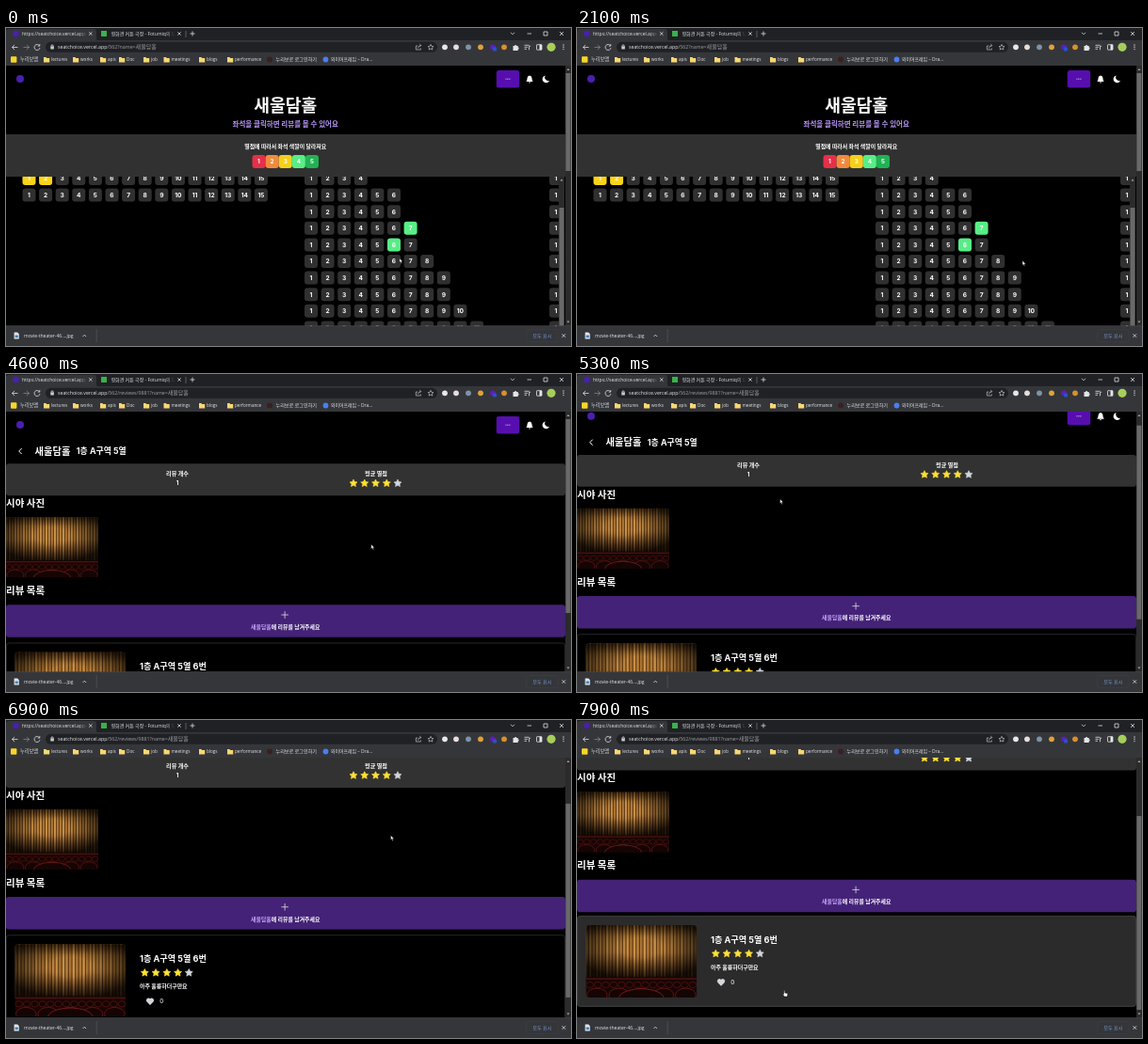
These frames come from a looping animation (600 by 338 pixels, 8000 ms). An HTML page:

```html
<!DOCTYPE html>
<html lang="ko">
<head>
<meta charset="utf-8">
<style>
  html, body { margin: 0; width: 100%; height: 100%; overflow: hidden; background: #000; }
  svg { display: block; width: 100vw; height: 100vh; }
  text { font-family: Inter, "Noto Sans CJK KR", "Noto Sans CJK", sans-serif; fill: #fff; white-space: pre; }
  .ui text, text.ui { font-family: "Open Sans", "Noto Sans CJK KR", "Noto Sans CJK", sans-serif; fill: #e3e5e8; }
  .b { font-weight: 700; }
  .m { text-anchor: middle; }
  text .dim { fill: #9aa0a6; }
  .line { fill: none; stroke: #dcdee1; stroke-width: .8; }
</style>
</head>
<body>
<svg id="stage" viewBox="0 0 600 338"></svg>
<script>
const HALL = '새울담홀';
const LOOP = 8000, PAGE_AT = 3000, HOVER_AT = 7450;
const range = n => Array.from({ length: n }, (_, i) => i);
const rect = (x, y, w, h, fill, r = 0, more = '') =>
  `<rect x="${x}" y="${y}" width="${w}" height="${h}" rx="${r}" fill="${fill}" ${more}/>`;
const dot = (x, y, r, fill) => `<circle cx="${x}" cy="${y}" r="${r}" fill="${fill}"/>`;
const line = (d, more = '') => `<path class="line" d="${d}" ${more}/>`;
const shape = (d, fill) => `<path d="${d}" fill="${fill}"/>`;
// y is the visual middle of the line of text
const text = (s, x, y, size, cls = '', more = '') =>
  `<text x="${x}" y="${y + size * .36}" font-size="${size}" class="${cls}" ${more}>${s}</text>`;
const cross = (x, y, r) => line(`M${x - r} ${y - r}l${2 * r} ${2 * r}m0 ${-2 * r}l${-2 * r} ${2 * r}`);

function star(x, y, r, fill) {
  const pts = range(10).map(i => {
    const a = i * Math.PI / 5 - Math.PI / 2, q = i % 2 ? r * .5 : r;
    return `${(x + q * Math.cos(a)).toFixed(2)},${(y + q * Math.sin(a)).toFixed(2)}`;
  });
  return `<polygon points="${pts.join(' ')}" fill="${fill}" stroke="${fill}" stroke-width=".6" stroke-linejoin="round"/>`;
}
const stars = (x, y) => range(5).map(i => star(x + i * 11.75, y, 4.2, i < 4 ? '#ffe135' : '#d2d5da')).join('');

function curtain() {
  const folds = range(33).map(i => {
    const glow = .5 + .5 * Math.sin(i * 2.3);
    return rect(i * 3, 0, .9 + glow, 48, '#f2c274', 0, `opacity="${(.1 + .35 * glow).toFixed(2)}"`) +
      rect(i * 3 + 2, 0, .9, 48, '#1c0b02', 0, 'opacity=".5"');
  }).join('');
  const seat = (x, y, rx, ry, color) =>
    `<ellipse cx="${x}" cy="${y}" rx="${rx}" ry="${ry}" fill="#150404" stroke="${color}" stroke-width=".8"/>`;
  const seats = (n, y, rx, ry, color) => range(n).map(i => seat((i + .5) * 98 / n, y, rx, ry, color)).join('');
  return rect(0, 0, 98, 64, '#1a0a03') + rect(0, 0, 98, 48, 'url(#gold)') + folds + rect(0, 0, 98, 48, 'url(#sides)') +
    rect(0, 46, 98, 18, '#180505') + rect(0, 47, 98, 1.3, '#4a120d') +
    seats(14, 53, 3.1, 2.6, '#4a110d') + seats(5, 62, 9, 6, '#5e1612') + seat(49, 65, 20, 8.5, '#7a1d17');
}

function chrome() {
  const folders = [[43, 'lectures'], [74, 'works'], [103, 'apis'], [123, 'Doc'], [149, 'job'],
    [170.5, 'meetings'], [208, 'blogs'], [238, 'performance']];
  const folder = x => shape(`M${x - 3} 31h2.4l.8 1h3v4.4h-6.2z`, '#f7d774');
  const extensions = [[466, '#e6e8ea'], [478, '#e8dddd'], [491, '#7d93a8'], [504, '#e1a13b'], [517, '#5b1fc4'], [529, '#d8902c']];
  return `<g class="ui">` +
    rect(0, 0, 600, 14, '#202124') + rect(0, 13, 600, 27, '#35363a') +
    shape('M0 14V4q0-3 3-3h90q3 0 3 3v7q0 3 3 3z', '#35363a') +
    dot(10.5, 6, 3.2, '#4a1fb0') +
    `<g clip-path="url(#tab1)">${text('https://seatchoice.vercel.app/562', 17, 6, 5)}</g>` + rect(77, 2, 9, 9, 'url(#fadeA)') + cross(89.8, 6, 1.7) +
    rect(101, 3, 6, 6, '#37b24d') +
    `<g clip-path="url(#tab2)">${text('영화관 커튼 극장 - Fotumiq의 무료', 111.5, 6, 5)}</g>` + rect(170, 2, 9, 9, 'url(#fadeB)') + cross(184, 6, 1.7) +
    line('M191 3v7', 'opacity=".4"') + line('M195.5 6h5m-2.5-2.5v5') +
    line('M536 4.8l2 2l2-2M553.5 6h4.5M571 4h4v4h-4z') + cross(590, 6, 2) +
    // toolbar
    line('M12.5 20.5h-6m2.6-2.6l-2.6 2.6l2.6 2.6') + line('M18.5 20.5h6m-2.6-2.6l2.6 2.6l-2.6 2.6', 'opacity=".45"') +
    line('M35.6 18.9a3 3 0 1 0 .4 2.2m-.2-4v2h-2') +
    rect(42, 14.8, 416, 11, '#202124', 5.5) + rect(47.3, 19.6, 3.6, 3, '#c8cacd', .5) + line('M48 20v-1a1.1 1.1 0 0 1 2.2 0v1') +
    `<text id="url" x="55" y="22.2" font-size="5.25"></text>` +
    `<g opacity=".75">` + line('M437 19h-1.6v4h5v-1.5M437.5 21.5q0-3 3.2-3m-1.4-1.4l1.5 1.4l-1.5 1.5') +
    line('M451 17.4l.9 2l2.1.2l-1.6 1.4l.5 2.1l-1.9-1.1l-1.9 1.1l.5-2.1l-1.6-1.4l2.1-.2z') + `</g>` +
    extensions.map(([x, c]) => dot(x, 20.3, 2.9, c)).join('') + rect(517, 20.5, 4, 4, '#2b50c8', .7) +
    shape('M538.5 19h1.6a1 1 0 0 1 2 0h1.6v1.6a1 1 0 0 1 0 2v1.4h-5.2z', '#e3e5e8') +
    line('M550.5 18.3h5m-5 2h3.5m-3.5 2h2.5m2.5 1v-4h1.6') + rect(563.5, 17.7, 5.5, 5.5, 'none', .5, 'stroke="#e3e5e8" stroke-width=".8"') +
    rect(566.5, 17.7, 2.5, 5.5, '#e3e5e8') + dot(579, 20.3, 4.6, '#a5cf5a') +
    [18, 20.3, 22.6].map(y => dot(592, y, .7, '#dcdee1')).join('') +
    // bookmarks
    rect(5, 30.3, 6.4, 6.4, '#f7d52b', 1) + text('누리보맵', 15, 33.4, 5.2) +
    folders.map(([x, s]) => folder(x) + text(s, x + 5, 33.4, 4.65)).join('') +
    dot(280, 33.5, 3, '#3a2020') + text('누리보로 로그인하기', 286.5, 33.4, 5.1) +
    dot(339.5, 33.5, 2.9, '#4a7df0') + text('와이어프레임 – Dra...', 345, 33.4, 4.9) +
    // downloads
    rect(0, 316.5, 600, 21.5, '#35363a') + rect(0, 316.5, 600, .6, '#4a4b4f') +
    shape('M8.6 323.6h3.6l1.6 1.6v5.2h-5.2z', '#e3e5e8') + rect(9.6, 326.5, 3.2, 2.6, '#3b82c4') +
    text('movie-theater-46....jpg', 19, 327.2, 5) + line('M81.5 328l1.8-1.8l1.8 1.8') + rect(95.8, 320, .6, 14, '#5a5b5f') +
    rect(552.5, 320.5, 33.5, 13, 'none', 2, 'stroke="#3e3f44" stroke-width=".6"') +
    text('모두 표시', 569.3, 327, 5.1, 'm', 'style="fill:#7596cc"') + cross(592.3, 327, 1.8) + `</g>`;
}

const header = () => dot(15, 54, 4, '#4a1fb0') +
  rect(520.8, 45, 24.4, 18.5, '#560fae', 2.5) + line('M530.3 54.2h5.6', 'stroke-dasharray="1.2 .5" opacity=".9"') +
  shape('M552.2 57q1.3-1 1.3-3.5q0-2.7 2.5-3.1q2.5.4 2.5 3.1q0 2.5 1.3 3.5zM555 57.6h2q0 1-1 1t-1-1z', '#fff') +
  shape('M572.6 50.4a4 4 0 1 0 4.6 5.6a3.9 3.9 0 0 1-4.6-5.6z', '#fff');

function seatPage() {
  const STEP = 17.6;
  const seat = (x, y, n, fill = '#303030') =>
    rect(x - 7, y - 7, 14, 14, fill, 3) + text(n, x, y, 6.6, 'b m');
  const row = (x, r, count, marks = {}) => range(count).map(i =>
    seat(x + i * STEP, 160 + r * STEP, i + 1, marks[i + 1])).join('');
  const GREEN = '#58ee86', GOLD = '#fcd416';
  const counts = [4, 6, 6, 7, 7, 8, 9, 9, 10, 11];
  const marks = { 3: { 7: GREEN }, 4: { 6: GREEN } };
  const ratings = ['#e5304a', '#f08b3e', '#f4cf1c', GREEN, '#21b253'];
  return header() + text(HALL, 296.7, 82, 18.2, 'b m') +
    text('좌석을 클릭하면 리뷰를 볼 수 있어요', 296.7, 102, 7.5, 'b m', 'style="fill:#b794f6"') +
    `<g clip-path="url(#seats)">` + row(24.5, 0, 15, { 1: GOLD, 2: GOLD }) + row(24.5, 1, 15) +
    counts.map((n, r) => row(324, r, n, marks[r]) + row(584, r, 1)).join('') + `</g>` +
    rect(0, 113, 594, 45, '#313131') + text('별점에 따라서 좌석 색깔이 달라져요', 296.7, 126.3, 5.9, 'b m') +
    ratings.map((c, i) => rect(261.5 + i * 14.1, 135, 14.1, 14, c, 3) + text(i + 1, 268.5 + i * 14.1, 142, 6.4, 'b m')).join('') +
    rect(587, 158, 6, 159, '#2b2b2b') + rect(587.5, 191, 5, 126, '#696969') + shape('M588.5 162.5l1.5-2l1.5 2z', '#aaa');
}

function reviewPage() {
  const photo = (x, y, k) => `<g transform="translate(${x} ${y}) scale(${k})" clip-path="url(#photo)"><use href="#curtain"/></g>`;
  const card = `<g id="card">` + rect(.4, 286, 593.2, 96, '#000', 3, 'id="cardBox" stroke="#303030" stroke-width=".8"') +
    photo(9.5, 295.5, 1.2) +
    text('1층 A구역 5열 6번', 142, 311.2, 9.15, 'b') + stars(147.3, 326) + text('아주 훌륭하더구만요', 142, 340.6, 5.95, 'b') +
    shape('M153 360.3l-3.5-3.5a2.3 2.3 0 0 1 3.5-3.2a2.3 2.3 0 0 1 3.5 3.2z', '#d2d5da') + text('0', 163.3, 356.3, 6.4) + `</g>`;
  return header() + line('M16.7 79l-3 3l3 3', 'style="stroke:#fff;stroke-width:1"') +
    text(HALL, 30.5, 81.8, 10.3, 'b') + text('1층 A구역 5열', 74.8, 82, 8.9, 'b') +
    rect(0, 95.3, 594, 33.9, '#323232', 3) +
    text('리뷰 개수', 182, 106.2, 6.1, 'b m') + text('1', 182, 115.9, 6, 'b m') +
    text('평균 별점', 393, 106.2, 6.1, 'b m') + stars(369, 116.2) +
    text('시야 사진', 0, 137.1, 10.5, 'b') + photo(0, 152, 1) +
    text('리뷰 목록', 0, 230.3, 10.5, 'b') +
    rect(0, 245.3, 594, 34.5, '#442277', 3) + line('M292.3 256h7.6m-3.8-3.8v7.6') +
    text(`<tspan fill="#c4a3fa">${HALL}</tspan>에 리뷰를 남겨주세요`, 296.7, 268.7, 5.9, 'b m') + card;
}

const stage = document.getElementById('stage');
const fade = (id, color) => `<linearGradient id="${id}"><stop stop-color="${color}" stop-opacity="0"/><stop offset="1" stop-color="${color}"/></linearGradient>`;
const clip = (id, ...box) => `<clipPath id="${id}">${rect(...box)}</clipPath>`;
stage.innerHTML = `<defs>
  <linearGradient id="gold" x2="0" y2="1"><stop stop-color="#5a3410"/><stop offset=".2" stop-color="#a06a2a"/><stop offset=".5" stop-color="#a86f2e"/><stop offset="1" stop-color="#4a250b"/></linearGradient>
  <radialGradient id="sides" cy=".42" r=".6"><stop offset=".3" stop-opacity="0"/><stop offset="1" stop-opacity=".8"/></radialGradient>
  ${fade('fadeA', '#35363a')}${fade('fadeB', '#202124')}
  ${clip('tab1', 17, 0, 69, 13)}${clip('tab2', 111, 0, 68, 13)}${clip('view', 0, 40, 600, 277)}
  ${clip('seats', 0, 158, 587, 159)}${clip('photo', 0, 0, 98, 64, '#000', 3)}
  <g id="curtain">${curtain()}</g></defs>` +
  rect(0, 0, 600, 338, '#000') +
  `<g clip-path="url(#view)"><g id="seatPage">${seatPage()}</g><g id="reviewPage">${reviewPage()}</g>` +
  rect(594, 40, 6, 277, '#2b2b2b') + rect(594.4, 48, 5, 206, '#696969', 0, 'id="thumb"') +
  shape('M595.5 45l1.5-2l1.5 2zM595.5 311.5l1.5 2l1.5-2z', '#aaa') + `</g>` + chrome() +
  `<g id="cursor" stroke="#000" stroke-width=".5" fill="#fff"><path id="arrow" d="M0 0v5l1.1-1l.8 1.8l.9-.4l-.8-1.7h1.6z"/>
  <path id="hand" d="M0 0q.8-.8 1.2 0v2l2.6.6q.5.2.4 1l-.5 2.4h-3l-1.9-2.4q.2-.8 1.2-.2z"/></g>`;

const el = id => document.getElementById(id);
// keyframes: [time, ...values]
const cursorPath = [[0, 417.8, 244.6], [900, 430, 246], [2100, 473, 247.2], [2700, 411, 229], [2950, 411, 229], [3600, 525, 219.5],
  [4400, 420, 190], [5200, 215.5, 132.8], [5300, 215.5, 132.8], [5900, 217, 147], [6300, 250, 150], [6900, 408.5, 122.6], [7150, 380, 150], [7700, 219.6, 288], [8000, 219.6, 288]];
const scrollPath = [[0, 0], [5110, 0], [5300, 9.3], [5900, 39.2], [6280, 57.2], [6900, 57.2], [7200, 75.6], [8000, 75.6]];

function sample(path, t, ease = k => k) {
  const i = Math.max(1, path.findIndex(p => p[0] > t));
  const a = path[i - 1], b = path[i], k = ease((t - a[0]) / (b[0] - a[0]));
  return a.slice(1).map((v, n) => v + (b[n + 1] - v) * k);
}
const show = (id, on) => el(id).setAttribute('display', on ? 'inline' : 'none');
const move = (id, x, y) => el(id).setAttribute('transform', `translate(${x} ${y})`);

let lastPage;
function draw(t) {
  const review = t >= PAGE_AT, hover = t >= HOVER_AT;
  const onSeat = t > 2650 && !review;
  const [scroll] = sample(scrollPath, t);
  const [x, y] = sample(cursorPath, t, k => k * k * (3 - 2 * k));
  if (review !== lastPage) {
    show('seatPage', !review);
    show('reviewPage', review);
    el('url').innerHTML = `seatchoice.vercel.app<tspan class="dim">/562${review ? '/reviews/9881' : ''}?name=<tspan font-size="6">${HALL}</tspan></tspan>`;
    lastPage = review;
  }
  move('reviewPage', 0, -scroll);
  el('thumb').setAttribute('y', 48 + scroll * .715);
  el('thumb').setAttribute('height', review ? 206 : 104);
  move('card', 0, hover ? -2 : 0);
  el('cardBox').setAttribute('fill', hover ? '#2b2b2b' : '#000');
  el('cardBox').setAttribute('stroke', hover ? '#4a4a4a' : '#303030');
  move('cursor', x, y);
  show('arrow', !hover && !onSeat);
  show('hand', hover || onSeat);
}

const start = performance.now();
function tick() {
  draw((performance.now() - start) % LOOP);
  requestAnimationFrame(tick);
}
draw(0);
tick();
</script>
</body>
</html>
```
